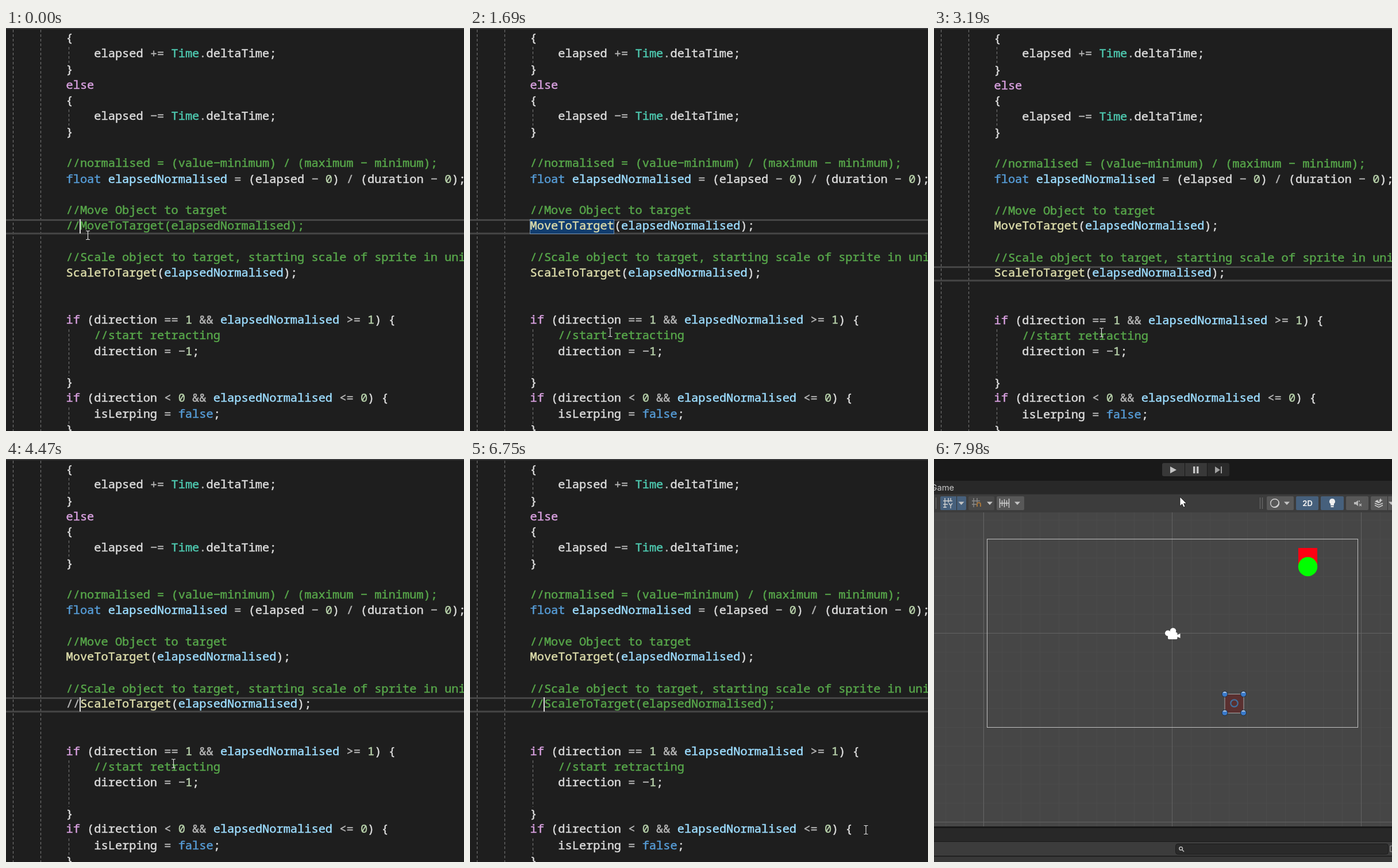
An HTML page for the animation above (8 s loop, 797 by 702 pixels).

```html
<!DOCTYPE html>
<html lang="en">
<head>
<meta charset="utf-8">
<title>Code edit</title>
<style>
html, body { margin: 0; width: 100%; height: 100%; overflow: hidden; background: #1e1e1e; }
svg { display: block; width: 797px; height: 702px; }
.code text { font: 20.33px "Noto Sans Mono", "DejaVu Sans Mono", monospace; font-variant-ligatures: none; white-space: pre; color: #dcdcdc; fill: currentColor; stroke: currentColor; stroke-width: .5px; }
.ui { font-family: Inter, Roboto, sans-serif; fill: #c8c8c8; }
</style>
</head>
<body>
<svg viewBox="0 0 797 702" xmlns="http://www.w3.org/2000/svg">
  <g id="editor" class="code">
    <rect width="797" height="702" fill="#1e1e1e"/>
    <rect width="797" height="2" fill="#3b3b3d"/>
    <path d="M12.5 3V702M60.5 3V702M109.5 33V61M109.5 142V170M109.5 525V606M109.5 661V690" stroke="#707070" stroke-width="1.2" stroke-dasharray="4.6 3.4"/>
    <path id="lineBox" d="M0 0H797M0 23.5H797" stroke="#464646" stroke-width="3"/>
    <rect id="mark" x="104.5" y="333.5" width="146" height="25" fill="#113d6f" stroke="#7290ae"/>
    <g id="rows"></g>
    <rect id="caret" width="2" height="25" fill="#dcdcdc"/>
    <path id="beam" d="M-3.5 -7.5H-1L0 -6.5L1 -7.5H3.5M0 -6.5V6.5M-3.5 7.5H-1L0 6.5L1 7.5H3.5" fill="none" stroke="#e2e2e2" stroke-width="1.2"/>
  </g>
  <g id="scene">
    <rect width="797" height="702" fill="#191919"/>
    <path d="M400 7H436V30H400Q397 30 397 27V10Q397 7 400 7ZM437 7H475V30H437Z" fill="#383838"/>
    <path d="M476 7H511Q514 7 514 10V27Q514 30 511 30H476Z" fill="#2b2b2b"/>
    <path d="M411 13L422 19L411 25ZM451 13H454.5V25H451ZM457 13H460.5V25H457Z" fill="#c4c4c4"/>
    <path d="M489 13L498 19L489 25ZM499 13H501V25H499Z" fill="#a0a0a0"/>
    <rect y="38" width="797" height="24" fill="#282828"/>
    <text class="ui" x="35" y="55" font-size="14.6" text-anchor="end">Game</text>
    <rect y="61.5" width="797" height="31.5" fill="#3c3c3c"/>
    <g id="buttons"></g>
    <g stroke="#d0d0d0" stroke-width="1.4" fill="none">
      <path d="M3.5 67V87" stroke="#666"/>
      <path d="M16 73H32M16 79H24M19 68V85M25 68V76M29 68V73M16 84H22M26 77L29 81L32 77M29 81V86"/>
      <path d="M66 73H80M66 79H74M69 68V84M75 68V76" stroke="#8a8a8a"/>
      <path d="M75 83V79Q75 76 78 76T81 79V83" stroke="#a5753c" stroke-width="2"/>
      <path d="M114.5 69V85M130.5 69V85M114 77H131M118.5 72V82M122.5 70V84M126.5 72V82"/>
      <path d="M567.5 67V87M571.5 67V87" stroke="#666"/>
      <circle cx="593" cy="77" r="7.3"/>
      <path d="M599 72A7 7 0 0 1 588 82A8 8 0 0 0 599 72Z" fill="#d0d0d0" stroke="none"/>
      <path d="M738 72L734 75H731V79H734L738 82Z" fill="#b8b8b8" stroke="none"/>
      <path d="M740 78L744 82M744 78L740 82M740 72V75" stroke="#b8b8b8"/>
      <path d="M767 77L774 80L781 77M767 80.5L774 84L781 80.5"/>
      <path d="M767 74L772 71L773 74L778 74L774 77ZM777 68L778 71L781 72L778 73L777 76L776 73L773 72L776 71Z" fill="#d0d0d0" stroke="none"/>
    </g>
    <path id="drops" fill="#c4c4c4"/>
    <text class="ui" x="650" y="82" font-size="13" font-weight="700" text-anchor="middle" style="fill:#eee">2D</text>
    <path d="M693 69A5 5 0 0 1 696 78V81H690V78A5 5 0 0 1 693 69ZM690.5 82H695.5V84H690.5Z" fill="#f0f0f0"/>
    <rect y="93" width="797" height="547" fill="#464646"/>
    <path id="minor" stroke="#4b4b4b"/>
    <path d="M86.5 93V640M414.5 93V640M743.5 93V640M0 303.5H797M0 632.5H797" stroke="#636363"/>
    <rect x="92.5" y="139.5" width="645" height="328" fill="none" stroke="#c2c2c2"/>
    <rect x="634" y="155" width="33" height="33" fill="#ff0012"/>
    <circle cx="650.5" cy="187.5" r="16.7" fill="#0f0"/>
    <g fill="#fff">
      <circle cx="407" cy="303.5" r="5"/><circle cx="416" cy="299.5" r="5.3"/>
      <rect x="407" y="302" width="16.5" height="12" rx="2"/>
      <path d="M422 307L428.5 304V312L422 309Z"/>
    </g>
    <rect x="506" y="409.5" width="33" height="33" fill="#5a3030" stroke="#a8a8a8"/>
    <circle cx="522.5" cy="425.5" r="6.2" fill="none" stroke="#41719f" stroke-width="2.2"/>
    <g id="handles"></g>
    <rect y="643" width="797" height="23" fill="#282828"/>
    <rect y="667" width="797" height="24" fill="#3c3c3c"/>
    <rect y="692.5" width="797" height="10" fill="#383838"/>
    <rect x="420.5" y="670.5" width="370" height="18" rx="4" fill="#2a2a2a" stroke="#1b1b1b"/>
    <path d="M432 681L435 684M432.5 678.5A2.8 2.8 0 1 1 426.9 678.5A2.8 2.8 0 1 1 432.5 678.5" fill="none" stroke="#c4c4c4" stroke-width="1.5"/>
    <path d="M797 674H794V684H797" fill="none" stroke="#aaa"/>
    <path id="arrow" d="M0 0V16L3.8 12.6L6.3 18L9 16.9L6.7 11.6H11.6Z" fill="#fff" stroke="#111" stroke-width=".8"/>
  </g>
</svg>
<script>
const $ = id => document.getElementById(id);
const LOOP = 8000, SCENE_AT = 6820, SETTLE_AT = 2380, CLICK_AT = 2660;
const LEFT = 104.5, ADVANCE = 12.2;
const MOVE_ROW = 12, SCALE_ROW = 15;
const GREEN = '#57a64a', OPERATOR = '#b4b4b4';

const source = `{
    elapsed += Time.deltaTime;
}
else
{
    elapsed -= Time.deltaTime;
}

//normalised = (value-minimum) / (maximum - minimum);
float elapsedNormalised = (elapsed - 0) / (duration - 0);

//Move Object to target
MoveToTarget(elapsedNormalised);

//Scale object to target, starting scale of sprite in units
ScaleToTarget(elapsedNormalised);


if (direction == 1 && elapsedNormalised >= 1) {
    //start retracting
    direction = -1;

}
if (direction < 0 && elapsedNormalised <= 0) {
    isLerping = false;
}`.split('\n');

const rules = [
  [/\/\/.*/, GREEN],
  [/\b(?:if|else)\b/, '#d8a0df'],
  [/\b(?:float|false)\b/, '#569cd6'],
  [/\bTime\b/, '#4ec9b0'],
  [/\belapsedNormalised\b/, '#9cdcfe'],
  [/\b\w+(?=\()/, '#dcdcaa'],
  [/\b\d+\b/, '#b5cea8'],
  [/[-+=<>&/.]+/, OPERATOR],
];
const lexer = new RegExp(rules.map(([re]) => `(${re.source})`).join('|'), 'g');

// The editor face draws its hyphen as wide as a minus sign.
const toMarkup = s => s.replace(/&/g, '&amp;').replace(/</g, '&lt;').replace(/-/g, '\u2212');
const tint = (s, color) => `<tspan color="${color}">${toMarkup(s)}</tspan>`;

function highlight(line) {
  let html = '', last = 0;
  for (const m of line.matchAll(lexer)) {
    html += toMarkup(line.slice(last, m.index));
    html += tint(m[0], rules[m.slice(1).findIndex(g => g !== undefined)][1]);
    last = m.index + m[0].length;
  }
  return html + toMarkup(line.slice(last));
}

// Rows whose baseline keeps its pixel when the view settles half a pixel lower.
const steadyRows = new Set([1, 4, 9, 12, 15, 20, 23]);
const baseline = (row, settled) =>
  Math.round(24 + 27.28 * row) + (settled && !steadyRows.has(row) ? 1 : 0);

$('rows').innerHTML = source.map(line => `<text x="${LEFT}">${highlight(line)}</text>`).join('');
const rows = [...$('rows').children];

// [x, width, fill]
$('buttons').innerHTML = [
  [11, 45, '#46607c'], [60, 45, '#484848'], [109, 48, '#585858'], [579, 47, '#585858'],
  [630, 39, '#46607c'], [673, 40, '#46607c'], [717, 39, '#585858'], [760, 45, '#585858'],
].map(([x, w, fill]) => `<rect x="${x}" y="65" width="${w}" height="24" rx="2" fill="${fill}"/>`).join('')
  + '<path d="M39.5 65V89M789.5 65V89" stroke="#343434"/>';
$('drops').setAttribute('d', [47.5, 97, 145, 614, 796].map(x => `M${x - 5} 74.5h10l-5 5.5z`).join(''));

const CELL = 32.87;
let grid = '';
for (let k = -13; k < 13; k++) {
  const x = Math.round(414 + k * CELL) + .5, y = Math.round(303 + k * CELL) + .5;
  grid += `M${x} 93V640`;
  if (y > 93 && y < 640) grid += `M0 ${y}H797`;
}
$('minor').setAttribute('d', grid);

$('handles').innerHTML = [[506, 409.5], [538.5, 409.5], [506, 442], [538.5, 442]].map(([x, y]) =>
  `<circle cx="${x}" cy="${y}" r="5" fill="#3a7acb" stroke="#1f2b3a"/>
   <path d="M${x - 3.6} ${y - 2.2}Q${x} ${y - 6.5} ${x + 3.6} ${y - 2.2}Z" fill="#c9d3de"/>`).join('');

// Pointer moves: [start, end, steps, x, y]
const beamMoves = [
  [70, 140, 2, 273, 488],
  [1560, 1690, 3, 244, 530],
  [1760, 1900, 3, 232, 541],
  [1970, 2310, 6, 100.5, 428],
  [2730, 2990, 5, 291.5, 530.5],
  [5940, 6070, 2, 367, 57],
  [6470, 6750, 5, 689, 646],
];
const arrowMoves = [[7290, 7980, 11, 428, 66]];

function place(el, x, y, moves, t) {
  for (const [start, end, steps, toX, toY] of moves) {
    if (t < start) break;
    const step = Math.floor((t - start) / (end - start) * (steps - 1) + 1e-6) + 1;
    const f = Math.min(1, step / steps);
    x += (toX - x) * f;
    y += (toY - y) * f;
  }
  el.setAttribute('transform', `translate(${x} ${y})`);
}

// Visible caret spans: [start, end, row, column]
const carets = [
  [0, 340, MOVE_ROW, 2], [820, 1020, MOVE_ROW, 1], [1020, 1560, MOVE_ROW, 0], [2090, 2660, MOVE_ROW, 0],
  [2660, 3190, SCALE_ROW, -1], [3660, 4200, SCALE_ROW, 0], [4270, 4470, SCALE_ROW, 1],
  [4470, 5010, SCALE_ROW, 2], [5540, 6070, SCALE_ROW, 2], [6600, 6820, SCALE_ROW, 2],
];

const show = (el, on) => el.setAttribute('display', on ? 'inline' : 'none');

function setRow(row, slashes, slashColor, commented) {
  const code = source[row];
  const html = tint('/'.repeat(slashes), slashColor) + (commented ? tint(code, GREEN) : highlight(code));
  if (rows[row].markup !== html) rows[row].innerHTML = rows[row].markup = html;
}

function render(t) {
  const inScene = t >= SCENE_AT;
  show($('scene'), inScene);
  show($('editor'), !inScene);
  if (inScene) {
    place($('arrow'), 414.5, 19, arrowMoves, t);
    return;
  }
  const settled = t >= SETTLE_AT;
  rows.forEach((el, i) => el.setAttribute('y', baseline(i, settled)));
  setRow(MOVE_ROW, t < 820 ? 2 : t < 1020 ? 1 : 0, t < 950 ? GREEN : OPERATOR, t < 950);
  setRow(SCALE_ROW, t < 4270 ? 0 : t < 4470 ? 1 : 2, t < 4540 ? OPERATOR : GREEN, t >= 4740);

  const activeRow = t < CLICK_AT ? MOVE_ROW : SCALE_ROW;
  $('lineBox').setAttribute('transform', `translate(0 ${baseline(activeRow) - 16.5})`);
  show($('mark'), t >= 1560 && t < CLICK_AT);

  const caret = carets.find(([start, end]) => t >= start && t < end);
  show($('caret'), caret);
  if (caret) {
    $('caret').setAttribute('x', Math.round(LEFT + caret[3] * ADVANCE - 1));
    $('caret').setAttribute('y', baseline(caret[2]) - 18);
  }
  place($('beam'), 142.5, 361, beamMoves, t);
}

const began = performance.now();
function tick() {
  render((performance.now() - began) % LOOP);
  requestAnimationFrame(tick);
}
tick();
</script>
</body>
</html>
```
